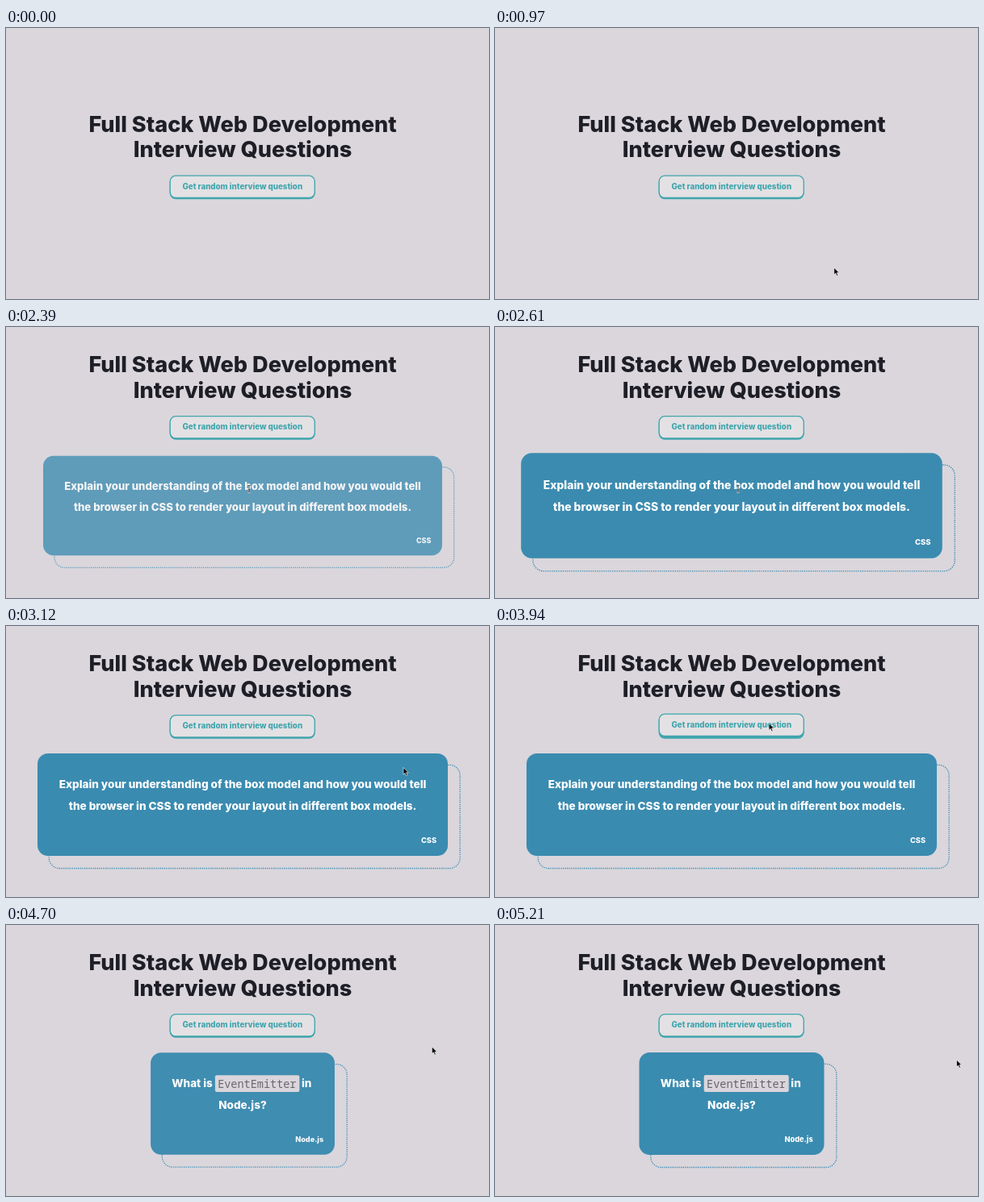
Write an HTML page that moves like this. It is 598 px wide and 336 px high and loops after 5.24 s.

```html
<!DOCTYPE html>
<html lang="en">
<head>
<meta charset="utf-8">
<title>Interview Questions</title>
<style>
  html, body { margin: 0; width: 100%; height: 100%; overflow: hidden; background: #dad6dc; }
  svg { display: block; width: 598px; height: 336px; }
  text { font-family: Inter, Roboto, sans-serif; font-weight: 800; }
  .title { font-size: 27.1px; fill: #1e1e26; text-anchor: middle; }
  .label { font-size: 9.75px; fill: #3fa5ad; text-anchor: middle; }
  .line { font-size: 13.55px; fill: #fff; }
  .mid { text-anchor: middle; }
  .tag { font-size: 9.2px; fill: #fff; text-anchor: end; }
  .code { font: 400 13.6px "Noto Sans Mono", "Liberation Mono", monospace; fill: #66646b; }
  .panel { fill: #3a8bb0; }
  .dots { fill: none; stroke: #3a8bb0; stroke-width: 1.3; stroke-dasharray: 1.3 1.3; }
</style>
</head>
<body>
<svg viewBox="0 0 598 336">
  <defs>
    <path id="caret" fill="none" d="M-1.8 -4.3Q0 -4.3 0 -3V3Q0 4.3 -1.8 4.3M1.8 -4.3Q0 -4.3 0 -3M0 3Q0 4.3 1.8 4.3M-1 1.4H1"/>
  </defs>
  <rect width="598" height="336" fill="#dad6dc"/>
  <g id="header">
    <text class="title" x="293" y="128.6">Full Stack Web Development</text>
    <text class="title" x="293" y="160">Interview Questions</text>
    <rect id="shadow" x="202.6" width="180.2" rx="7.6" fill="#3fa5ad"/>
    <g id="face">
      <rect x="203.2" y="183.2" width="179" height="27.2" rx="7" fill="#e3e1e4" stroke="#3fa5ad" stroke-width="1.2"/>
      <text class="label" x="292.8" y="199.6">Get random interview question</text>
    </g>
  </g>
  <g id="cssCard">
    <rect class="dots" x="53.3" y="172.3" width="508.8" height="128.2" rx="13"/>
    <rect class="panel" x="39" y="158" width="508" height="127" rx="13"/>
    <text class="line mid" x="293" y="201.3">Explain your understanding of the box model and how you would tell</text>
    <text class="line mid" x="293" y="228.3">the browser in CSS to render your layout in different box models.</text>
    <text class="tag" x="533" y="269">CSS</text>
  </g>
  <g id="nodeCard">
    <rect class="dots" x="192.8" y="172.3" width="230" height="128.2" rx="13"/>
    <rect class="panel" x="178.5" y="158" width="229" height="127" rx="13"/>
    <text class="line" x="255.5" y="201.3" text-anchor="end">What is</text>
    <rect x="258.7" y="186" width="105" height="21" rx="2" fill="#dad6dc"/>
    <text class="code" x="262" y="201.6">EventEmitter</text>
    <text class="line" x="366.3" y="201.3">in</text>
    <text class="line mid" x="293" y="228.3">Node.js?</text>
    <text class="tag" x="393.7" y="269">Node.js</text>
  </g>
  <g id="pointer">
    <path id="arrow" d="M0 0V8.6L2 6.8 3.4 10 4.9 9.4 3.5 6.3H6.2Z" fill="#000" stroke="#fff" stroke-width=".6"/>
    <g id="beam">
      <use href="#caret" stroke="#fff" stroke-width="1.9"/>
      <use href="#caret" stroke="#111" stroke-width=".8"/>
    </g>
  </g>
</svg>
<script>
const LOOP = 5240, FIRST = 2200, SECOND = 4350, BOUNCE = 750;
const el = id => document.getElementById(id);
const clamp = v => Math.min(1, Math.max(0, v));
const mix = (a, b, k) => a + (b - a) * k;
const smooth = k => k * k * (3 - 2 * k);
const outQuad = k => 1 - (1 - k) * (1 - k);
const show = (id, on) => el(id).setAttribute('display', on ? 'inline' : 'none');

// cubic-bezier(.215, .61, .355, 1)
function ease(x) {
  const curve = (u, a, b) => 3 * (1 - u) ** 2 * u * a + 3 * (1 - u) * u * u * b + u ** 3;
  let lo = 0, hi = 1;
  for (let i = 0; i < 24; i++) {
    const u = (lo + hi) / 2;
    if (curve(u, .215, .355) < x) lo = u; else hi = u;
  }
  return curve(lo, .61, 1);
}

const SCALES = [.3, 1.1, .9, 1.03, .97, 1];
function bounceIn(id, age) {
  const p = clamp(age / BOUNCE) * 5, i = Math.min(4, Math.floor(p));
  const scale = mix(SCALES[i], SCALES[i + 1], ease(p - i));
  el(id).setAttribute('transform', `translate(293 221.5) scale(${scale}) translate(-293 -221.5)`);
  el(id).setAttribute('opacity', ease(clamp((age - 25) / (BOUNCE * .6))));
}

// start, end, from, to, easing
const MOVES = [
  [869, 1500, [470, 338], [301, 200.5], outQuad],
  [2660, 3060, [301, 200.5], [492, 175.5], smooth],
  [3400, 3950, [492, 175.5], [339, 120.5], smooth],
  [4480, 4800, [339, 120.5], [583, 160], smooth],
  [4800, 4900, [583, 160], [571.5, 167.2], smooth]
];
function pointerAt(t) {
  const [start, end, a, b, easing] = MOVES.findLast(m => t >= m[0]) || MOVES[0];
  const k = easing(clamp((t - start) / (end - start)));
  return [mix(a[0], b[0], k), mix(a[1], b[1], k)];
}

const pulse = (t, on, off) => smooth(clamp((t - on) / 150)) - smooth(clamp((t - off) / 150));

function draw(t) {
  el('header').setAttribute('transform', `translate(0 ${t < FIRST ? 0 : -72.5})`);

  const lift = 1.5 * (pulse(t, 1310, FIRST) + pulse(t, 3757, 4566));
  el('face').setAttribute('transform', `translate(0 ${-lift})`);
  el('shadow').setAttribute('y', 184 - lift);
  el('shadow').setAttribute('height', 28.2 + lift);

  show('cssCard', t >= FIRST && t < SECOND);
  show('nodeCard', t >= SECOND);
  bounceIn('cssCard', t - FIRST);
  bounceIn('nodeCard', t - SECOND);

  const overText = t >= FIRST && t < 2870;
  show('pointer', t >= MOVES[0][0]);
  show('arrow', !overText);
  show('beam', overText);
  el('pointer').setAttribute('transform', `translate(${pointerAt(t)})`);
}

const began = performance.now();
function tick() {
  draw((performance.now() - began) % LOOP);
  requestAnimationFrame(tick);
}
draw(0);
tick();
</script>
</body>
</html>
```
